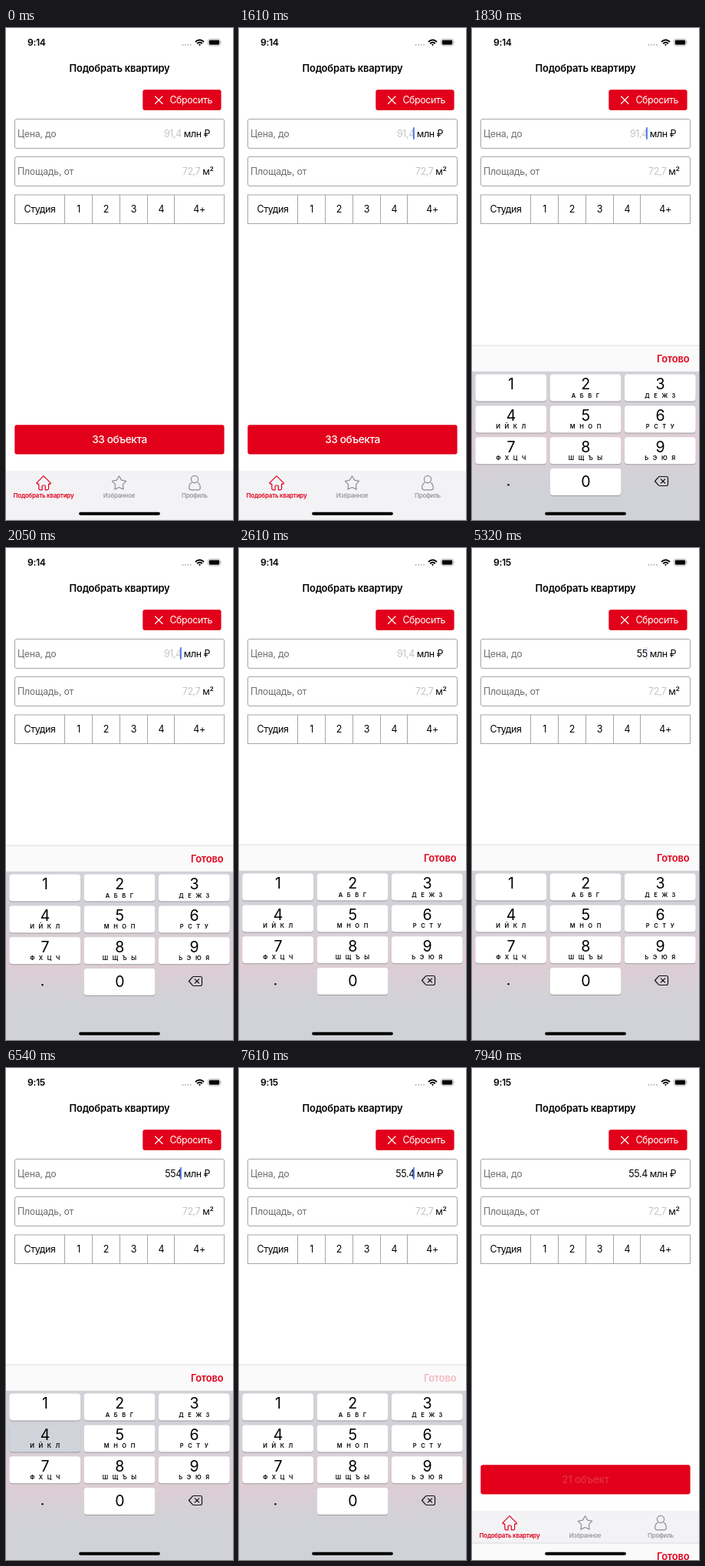
Animation, 296 px wide and 640 px high, one loop 8 s. Source, as an HTML page:

```html
<!DOCTYPE html>
<html lang="ru">
<head>
<meta charset="utf-8">
<style>
html, body { margin: 0; width: 100%; height: 100%; overflow: hidden; background: #fff; }
svg { display: block; width: 100vw; height: 100vh; }
text { font: 400 12.4px Inter, "Open Sans", sans-serif; letter-spacing: -.03em; }
.mid { text-anchor: middle; }
.end { text-anchor: end; }
.label { fill: #707070; letter-spacing: -.02em; }
.title { font-size: 12.9px; font-weight: 600; letter-spacing: -.013em; }
.clock { font-size: 12.2px; font-weight: 600; }
.main { font-size: 13.6px; font-weight: 500; }
.tab { font-size: 8px; font-weight: 500; }
.digit { font-size: 19.5px; }
.letters { font-size: 7.5px; font-weight: 600; letter-spacing: 5.6px; }
.line { fill: none; stroke-width: 1.2; stroke-linecap: round; stroke-linejoin: round; }
.box { fill: #fff; stroke: #a6a6a6; stroke-width: 1; }
</style>
</head>
<body>
<svg viewBox="0 0 296 640" id="stage">
  <defs>
    <linearGradient id="panelFill" gradientUnits="userSpaceOnUse" x1="0" y1="475" x2="0" y2="592">
      <stop offset="0" stop-color="#d1d2d8"/>
      <stop offset=".5" stop-color="#dfccd3"/>
      <stop offset="1" stop-color="#d1d2d8"/>
    </linearGradient>
  </defs>

  <text id="clock" class="clock" x="28" y="23"></text>
  <g fill="#b5b5b5">
    <circle cx="230.5" cy="22" r="1"/><circle cx="234" cy="22" r="1"/>
    <circle cx="237.5" cy="22" r="1"/><circle cx="241" cy="22" r="1"/>
  </g>
  <g fill="none" stroke="#000" stroke-width="1.9">
    <path d="M247 18q5.500-5 11 0M249.200 20.200q3.300-3 6.600 0"/>
    <path d="M252.500 23.300l-1.600-1.700q1.600-1.200 3.200 0z" fill="#000" stroke="none"/>
  </g>
  <rect x="263.500" y="14.500" width="16" height="8.500" rx="2.500" fill="none" stroke="#a5a5a5" stroke-width=".8"/>
  <rect x="264.800" y="15.800" width="13.400" height="5.900" rx="1.400"/>
  <path d="M280.600 17.200q1.600 1.500 0 3z" fill="#a5a5a5"/>

  <text class="title mid" x="148" y="57">Подобрать квартиру</text>

  <rect x="178.300" y="80.300" width="102.300" height="26.600" rx="3" fill="#e2001a"/>
  <path class="line" stroke="#fff" d="M194.500 89l9.500 9.500m0-9.500l-9.500 9.500"/>
  <text x="213.400" y="98" fill="#fff">Сбросить</text>

  <rect class="box" x="11.500" y="118.500" width="273" height="38" rx="2.500"/>
  <text class="label" x="15" y="142">Цена, до</text>
  <text id="price" class="end" x="228.800" y="142"></text>
  <text class="end" x="266" y="142">млн ₽</text>
  <rect id="caret" x="227.100" y="129" width="1.700" height="16" rx=".8" fill="#426bf2"/>

  <rect class="box" x="11.500" y="167.500" width="273" height="38" rx="2.500"/>
  <text class="label" x="15" y="191">Площадь, от</text>
  <text class="end" x="253.500" y="191" fill="#c4c4c6">72,7</text>
  <text class="end" x="270.500" y="191">м²</text>

  <rect class="box" x="11.500" y="217" width="273" height="37.500"/>
  <path class="box" d="M76.500 217v37.500M112.500 217v37.500M148.500 217v37.500M184.500 217v37.500M219.500 217v37.500"/>
  <g id="rooms"></g>

  <rect x="11.300" y="516.300" width="273.300" height="38.200" rx="3" fill="#e2001a"/>
  <text id="count" class="main mid" x="148" y="540" fill="#fff"></text>

  <rect y="577" width="296" height="63" fill="#f3f3f6"/>
  <path d="M0 577h296" stroke="#e2e2e5" stroke-width=".6"/>
  <path class="line" stroke="#e2001a" d="M39.800 591.800L49 582.600l9.200 9.200q.8 1.200-.9 1.300h-1.700v6q0 1.700-1.700 1.700h-2.600v-4.800q0-1-1-1h-2.200q-1 0-1 1v4.800h-2.600q-1.700 0-1.700-1.700v-6h-1.700q-1.700-.1-.3-1.300z"/>
  <path id="star" class="line" stroke="#8e8e93"/>
  <g class="line" stroke="#8e8e93">
    <circle cx="246" cy="587" r="4.600"/>
    <path d="M241.800 591.500q-3.100 2-3.100 6.500 0 2.800 2.800 2.800h9q2.800 0 2.800-2.800 0-4.500-3.100-6.500"/>
  </g>
  <text class="tab mid" x="49" y="611" fill="#e2001a" style="font-weight:600">Подобрать квартиру</text>
  <text class="tab mid" x="147.500" y="611" fill="#8e8e93">Избранное</text>
  <text class="tab mid" x="246" y="611" fill="#8e8e93">Профиль</text>

  <rect id="panel" width="296" height="260" fill="url(#panelFill)"/>
  <g id="keyboard">
    <rect y="386" width="296" height="33.500" fill="#fafafa"/>
    <path d="M0 386h296" stroke="#d4d4d6" stroke-width=".8"/>
    <text id="done" class="title end" x="283.400" y="407.500" fill="#e2001a">Готово</text>
    <g id="keys"></g>
    <circle cx="47.500" cy="567.200" r="1.200"/>
    <path class="line" stroke="#111" d="M238.500 562.500l4.800-5.400q.6-.6 1.400-.6h8.800q2 0 2 2v8q0 2-2 2h-8.800q-.8 0-1.400-.6zM246.300 559.800l5.400 5.400m0-5.400l-5.400 5.400"/>
  </g>
  <rect x="95.100" y="629.800" width="105.800" height="4" rx="2"/>
</svg>
<script>
const $ = id => document.getElementById(id);

$('rooms').innerHTML = [['Студия', 44], [1, 94.6], [2, 130.3], [3, 166.3], [4, 202.2], ['4+', 252]]
  .map(([s, x]) => `<text class="mid" x="${x}" y="240">${s}</text>`).join('');

$('star').setAttribute('d', 'M' + Array.from({length: 10}, (_, i) => {
  const a = i * Math.PI / 5, r = i % 2 ? 5.2 : 9.6;
  return (147.5 + r * Math.sin(a)).toFixed(1) + ' ' + (592.3 - r * Math.cos(a)).toFixed(1);
}).join('L') + 'z');

const letters = ['', 'АБВГ', 'ДЕЖЗ', 'ИЙКЛ', 'МНОП', 'РСТУ', 'ФХЦЧ', 'ШЩЪЫ', 'ЬЭЮЯ'];
function key(n, col, row) {
  const x = 4.3 + 97.3 * col, y = 423.6 + 40.8 * row, cx = x + 46.4;
  return `<rect x="${x}" y="${y + 1}" width="92.8" height="35" rx="4" fill="#98999d"/>
    <rect id="k${n}" x="${x}" y="${y}" width="92.8" height="35" rx="4" fill="#fff"/>
    <text class="digit mid" x="${cx}" y="${y + (n ? 19.6 : 23.6)}">${n}</text>
    <text class="letters mid" x="${cx + 2.8}" y="${y + 30}">${letters[n - 1] || ''}</text>`;
}
$('keys').innerHTML = letters.map((_, i) => key(i + 1, i % 3, Math.floor(i / 3))).join('') + key(0, 1, 3);

// Step tracks: [time, value], each value holds until the next
const ticks = [0, 1480, 1590, 1710, 1830, 1940, 2050, 2160, 7730, 7830, 7940].map(t => [t, t]);
const price = [[0, ''], [4280, '5'], [4920, '55'], [6540, '554'], [6770, '55.4']];
const caret = [[0, 0], [1480, 1], [2490, .5], [2610, 0], [3150, .5], [3270, 1], [3510, .5], [3620, 0],
  [4020, 1], [5320, .25], [5560, .4], [5680, .8], [5840, 1], [7160, .25], [7400, .6], [7510, 1], [7730, 0]];
const five = [[0, 0], [4130, 1], [4280, .4], [4390, 0], [4570, .6], [4690, 1], [4920, 0]];
const four = [[0, 0], [6410, 1], [6540, .6], [6770, 0]];
const done = [[0, 1], [7400, .6], [7510, .25], [7830, .65], [7940, 1]];

const at = (track, t) => track.findLast(s => s[0] <= t)[1];
const keyFill = p => `rgb(${255 - 76 * p},${255 - 71 * p},${255 - 61 * p})`;

// Critically damped spring, from 1 to 0
function spring(ms) {
  const x = Math.max(0, ms) * .01826;
  return (1 + x) * Math.exp(-x);
}

function draw(now) {
  const t = now % 8000, q = at(ticks, t), late = t >= 4130, text = at(price, t);
  const drop = Math.round(254 * (t < 5000 ? spring(q - 1622) : 1 - spring(q - 7718)));
  $('keyboard').setAttribute('transform', `translate(0 ${drop})`);
  $('panel').setAttribute('y', 419.5 + drop);
  $('clock').textContent = late ? '9:15' : '9:14';
  $('price').textContent = text || '91,4';
  $('price').setAttribute('fill', text ? '#000' : '#c4c4c6');
  $('caret').setAttribute('opacity', at(caret, t));
  $('k5').setAttribute('fill', keyFill(at(five, t)));
  $('k4').setAttribute('fill', keyFill(at(four, t)));
  $('done').setAttribute('opacity', at(done, t));
  $('count').textContent = late ? '21 объект' : '33 объекта';
  $('count').setAttribute('opacity', late ? .18 : 1);
  requestAnimationFrame(draw);
}
draw(0);
</script>
</body>
</html>
```
